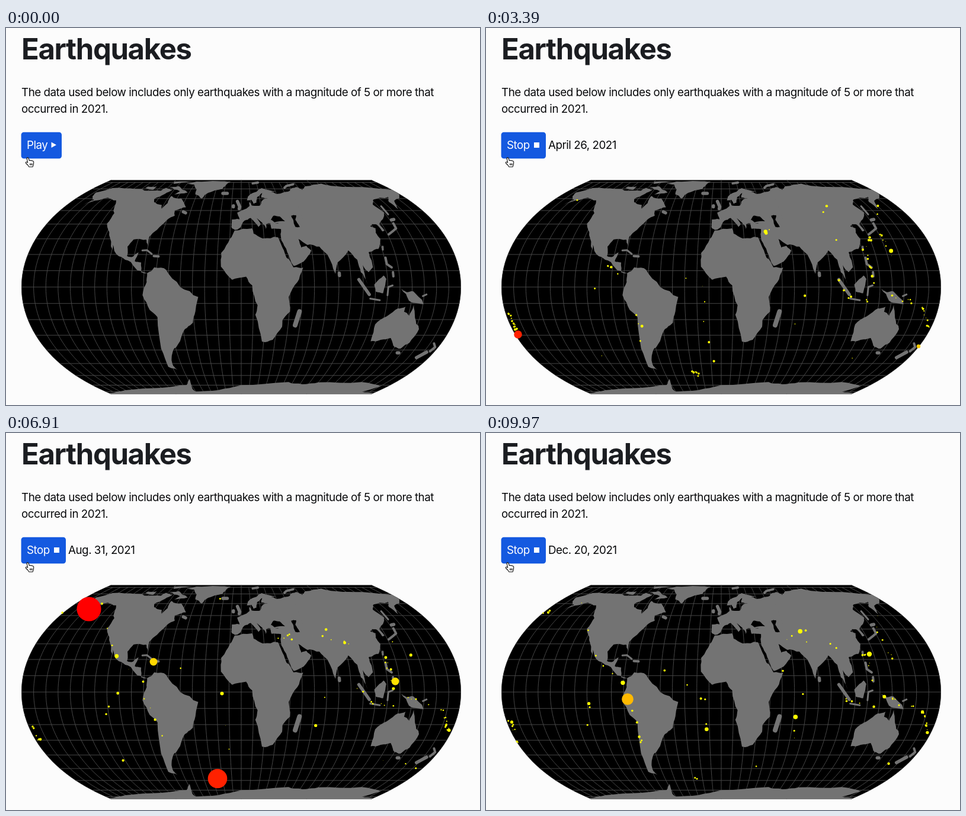
An HTML page with a canvas for the animation above (10000 ms loop, 800 by 636 pixels).

```html
<!DOCTYPE html>
<html lang="en">
<head>
<meta charset="utf-8">
<title>Earthquakes</title>
<style>
  html, body { margin: 0; width: 100%; height: 100%; overflow: hidden; background: #fcfcfc; }
  canvas, svg { position: absolute; left: 0; top: 0; width: 800px; height: 636px; }
  text { font: 18.8px Inter, "Open Sans", sans-serif; letter-spacing: -0.0256em; fill: #08090b; }
  .title { font-size: 49px; font-weight: 700; letter-spacing: -0.0277em; fill: #1b1d21; }
  .label { fill: #fff; }
</style>
</head>
<body>
<canvas id="map" width="800" height="636"></canvas>
<svg viewBox="0 0 800 636">
  <text class="title" x="26" y="53">Earthquakes</text>
  <text x="26" y="115">The data used below includes only earthquakes with a magnitude of 5 or more that</text>
  <text x="26" y="143">occurred in 2021.</text>
  <rect id="button" x="25.6" y="175.7" height="44.5" rx="4.5" fill="#1459e0"/>
  <text id="label" class="label" x="35" y="204">Play</text>
  <path id="icon" fill="#fff"/>
  <text id="date" x="105" y="204"></text>
  <path d="M35 219.6c.8-1.5 2.6-1.2 3 .2l1.3 3.7 1.3-.3 1.4.5 1.4-.2 1.3.8c1.6 0 2.1 1 2 2.5l-.4 3.8-1.2 3.6h-6.3l-1.7-2.7-3.6-3.5c-.8-1.5.7-2.5 2-1.7l1.2.8zM40.6 228.5v3M42.4 228.5v3M44.2 228.5v3" fill="#fff" stroke="#111" stroke-width="1.1" stroke-linejoin="round"/>
</svg>
<script>
const LOOP = 10000, START = 190, DAYS_PER_MS = 0.0361, LIFE = 60;
const $ = id => document.getElementById(id);
const rad = Math.PI / 180;
const mix = (a, b, f) => a + (b - a) * f;
const pairs = s => s.trim().split(',').map(p => p.trim().split(' ').map(Number));

let seed = 2021;
function rand() {
  seed = (seed + 0x6D2B79F5) | 0;
  let t = Math.imul(seed ^ (seed >>> 15), 1 | seed);
  t ^= t + Math.imul(t ^ (t >>> 7), 61 | t);
  return ((t ^ (t >>> 14)) >>> 0) / 4294967296;
}

// Equal Earth projection
function project([lon, lat]) {
  const M = Math.sqrt(3) / 2, a = 1.340264, b = -0.081106, c = 0.000893, d = 0.003796;
  const l = Math.asin(M * Math.sin(lat * rad)), l2 = l * l, l6 = l2 ** 3;
  const x = lon * rad * Math.cos(l) / (M * (a + 3 * b * l2 + l6 * (7 * c + 9 * d * l2)));
  const y = l * (a + b * l2 + l6 * (c + d * l2));
  return [397 + 137.07 * x, 437 - 137.07 * y];
}

const base = document.createElement('canvas');
base.width = 800;
base.height = 636;
const g = base.getContext('2d');
g.lineCap = g.lineJoin = 'round';

function trace(points) {
  g.beginPath();
  points.forEach(p => g.lineTo(...project(p)));
}
const meridian = (lon, top) => Array.from({ length: 61 }, (_, i) => [lon, top * (i / 30 - 1)]);

// Adds a displaced midpoint to every edge
function roughen(points) {
  return points.flatMap(([x, y], i) => {
    const [x2, y2] = points[(i + 1) % points.length];
    const size = Math.min(1.4, 0.2 * Math.hypot(x2 - x, y2 - y));
    return [[x, y], [mix(x, x2, 0.5) + (rand() - 0.5) * size, mix(y, y2, 0.5) + (rand() - 0.5) * size]];
  });
}

function land(outline, colour = '#737373') {
  g.fillStyle = colour;
  trace(roughen(roughen(pairs(outline))));
  g.fill();
}

// Long islands as thick rounded strokes
function islands(width, lines) {
  g.strokeStyle = '#737373';
  g.lineWidth = width;
  for (const line of lines.split(';')) {
    trace(pairs(line));
    g.stroke();
  }
}

trace([...meridian(-180, 90), ...meridian(180, 90).reverse()]);
g.fillStyle = '#000';
g.fill();
g.clip();
g.strokeStyle = '#464646';
for (let lon = -180; lon <= 180; lon += 10) {
  trace(meridian(lon, lon % 90 ? 80 : 90));
  g.stroke();
}
for (let lat = -80; lat <= 80; lat += 10) {
  trace([[-180, lat], [180, lat]]);
  g.stroke();
}

// North America, Greenland and the Arctic
land(`-168 66,-157 71,-128 70,-110 68,-95 68,-92 71.5,-82 69,-87 64.5,-94 60,-92 57,-82 54.5,-80 51.3,-77 56,
-78 62.4,-70 60,-65 60,-56 52.5,-66 50,-64 46,-70 43,-76 36,-81 31.5,-80.3 25.3,-83 29.5,-94 29.6,-97.5 25,
-96 19,-91 18.6,-87 21.4,-88.8 15.9,-83.3 15,-82.5 9,-77.5 8.5,-85.8 10.2,-94.5 16.2,-105.5 20.3,-113 31,
-109.5 23,-117 32.5,-124.3 40.3,-124 48,-134 58.5,-146 60.8,-154 58.5,-163 54.8,-158 58.7,-165 62`);
land('-70 77,-60 82,-32 83.5,-14 81.5,-20 74,-23 70,-38 65.7,-43 60,-52 64,-54 70,-60 76');
land('-62 66,-76 64,-72 67.5,-89 72,-78 73.6');
land('-117 71,-105 69,-105 73,-116 73');
land('-88 77,-64 82.5,-90 81.5');
// South America
land(`-77.5 8.5,-72 12,-62 10.5,-50 0,-35.3 -6,-39 -17,-41 -22,-48.5 -26,-57 -36,-62.3 -39.5,-67 -46,-68.5 -52,
-66 -55,-74 -52.5,-73.6 -39,-70.3 -18.4,-76 -14,-81 -5,-77.5 3`);
// Africa
land(`-6 35.5,10 37,11 33.5,19 30.3,32.5 31,35.5 24,38 18,43.2 12,51.2 11.8,46 3,39 -6,40.6 -15,35 -20,35 -24.5,
28 -33,18.5 -34.2,11.8 -17,13.5 -11,9 1,4 6.3,-7.5 4.4,-16.8 12.5,-17 21,-10 30`);
// Europe
land(`-6 36,-9 38,-8.8 43.3,-1.5 43.4,-4 48.4,8.5 53.7,8.5 57,11 54,20 54.5,23.5 59,29 60,22 61,24 65.5,17.3 61,
16 56.5,12.8 55.5,11 59,6 58.5,10 64,25 71,41 67,35 66.5,40 64.5,60 69,62 40,36 40,27 40.5,23 40,22.5 36.5,
19.5 41,13 45.5,18 40,15.8 38,9 44.4,3 42.5,-1 37.5`);
// Asia
land(`58 69,68 72.5,73 69,80 73.5,104 77.6,113 74,140 72.5,180 69,180 65,171 60,163 58,157 51,156 57,162 61.5,
143 59.3,136 54.7,140 48.5,127.5 40,129 35.5,126.5 35,125 39.5,121 40,118 38.5,122 37,120 34,121.8 30,117 23.5,
108 21.5,109 12,105 9,100.9 13.4,103.5 1.5,98.5 9,97 16.7,91 22.5,80.2 15,77.5 8,72.6 20,67 25,57 26,50 30,
51.5 24.3,56 25.5,59.5 22.5,52 15.6,43.5 12.8,39 21.3,35 29,36 36.5,27.5 36.7,27 40.5,58 42`);
// Black Sea and Caspian Sea
land('28 43,31 46,37 45.5,41 42,31 41.3', '#000');
land('48 46,53 46.5,51 43,53.5 38,49.5 38,49 42', '#000');
// Australia and Antarctica
land(`114 -23,115.5 -34,124 -33,132 -31.8,140 -38,146.5 -39,151 -35,153 -26,146 -18.8,142.5 -10.8,140.5 -17.5,
135.5 -15,136 -12,130 -13,122 -18`);
land(`-180 -90,-180 -84,-150 -77,-100 -73.5,-66 -70,-58 -63.3,-62 -75,-60 -80,-30 -77,0 -70,55 -66.5,73 -69,
90 -66.8,140 -66.5,171 -71.5,160 -80,180 -84,180 -90`);
land('109 1.5,117 7,119 5,116.3 -3.8,110.2 -2.8');
land('131 -1,135 -3,141 -2.6,150.5 -10.5,138 -8.3');
islands(3, `106 -7,114 -8;120 -5,120.5 0,124 1;142.5 47,143 53.5;-84 22.5,-80 22.7,-75.5 20.3;120.6 23,121.3 25;
149 -5.5,152 -4.5`);
islands(4, `131 33,137 35.5,140.5 37,141 40.5;121 18,121 14,124.5 12;125 9,125 6.5;173.5 -35.5,177 -38,175.5 -41;
-73.5 19,-69.5 18.8;15 78,22 79.5;53 71.5,57 74,67 76.5`);
islands(5.5, `-2 51.5,-1.5 53,-4 57.5;-8 53.8,-8 53;-21 65,-16 65;96.5 4.5,105 -4.5;141.5 43,144 43.3;
173 -41.5,168 -45.5;146 -42,147.5 -42;80.7 8.5,80.7 7;-57 49,-54.5 48.2`);
islands(8, '46 -23.5,48.5 -15');

// Quakes: [day, x, y, magnitude]
const quakes = pairs(`62.5 54 517 8.1,40.5 737 499 7.7,62.5 730 537 7.3,43.5 659 336 7.1,120.5 658 335 6.8,
133 596 436 6.7,209 140 297 8.2,223 357 583 8.1,225 249 386 7.2,222 657 419 7.1,274 745 495 7.3,250 195 390 7,
331 239 449 7.5,312 647 373 6.7`);

// Scatters small quakes along a plate boundary
function zone(count, spread, line) {
  const p = pairs(line);
  for (let i = 0; i < count; i++) {
    const u = rand() * (p.length - 1), k = Math.floor(u);
    const at = j => mix(p[k][j], p[k + 1][j], u - k) + (rand() + rand() - 1) * spread;
    quakes.push([rand() * 362, at(0), at(1), Math.min(6.4, 5.45 - 0.3 * Math.log(1 - rand()))]);
  }
}
zone(70, 4, '39 480,56 522');                           // Tonga
zone(60, 4, '736 468,747 504');                         // Vanuatu
zone(45, 5, '673 445,726 466');                         // New Guinea
zone(50, 5, '592 424,613 455,660 460');                 // Sunda arc
zone(45, 5, '640 372,657 435');                         // Philippines
zone(45, 4, '637 375,658 340,662 300');                 // Japan and Kurils
zone(30, 4, '662 345,690 388');                         // Marianas
zone(24, 3, '94 305,168 285');                          // Aleutians
zone(18, 3, '168 321,190 386');                         // California
zone(26, 4, '195 390,230 422');                         // Central America
zone(36, 5, '233 447,263 510,260 535');                 // Andes
zone(24, 6, '188 432,170 470,200 576');                 // East Pacific
zone(40, 4, '350 577,358 585');                         // South Sandwich
zone(36, 5, '365 281,298 398,365 440,371 500,384 580'); // Mid-Atlantic
zone(30, 6, '497 400,540 440,514 518,433 573');         // Indian Ocean
zone(14, 7, '540 545,688 560');                         // Southern Ocean
zone(40, 7, '440 340,530 345,598 358');                 // Alps to Himalaya
zone(16, 5, '530 337,585 295');                         // Central Asia
quakes.sort((a, b) => a[3] - b[3]);

// Yellow through orange to red
function colour(m) {
  const green = m < 7.7 ? 255 - 100 * Math.max(0, m - 6.8) : 330 * (8.2 - m);
  return `rgb(255,${Math.round(green)},0)`;
}

const months = ['Jan.', 'Feb.', 'March', 'April', 'May', 'June', 'July', 'Aug.', 'Sep.', 'Oct.', 'Nov.', 'Dec.'];
function dateText(day) {
  const d = new Date(Date.UTC(2021, 0, 1 + Math.floor(day)));
  return `${months[d.getUTCMonth()]} ${d.getUTCDate()}, 2021`;
}

const ctx = $('map').getContext('2d');
function draw() {
  const t = performance.now() % LOOP, playing = t >= START;
  const day = (t - START) * DAYS_PER_MS;
  $('label').textContent = playing ? 'Stop' : 'Play';
  $('button').setAttribute('width', playing ? 75.4 : 68.4);
  $('icon').setAttribute('d', playing ? 'M81 193h9v9h-9z' : 'M76.5 192.5l8.5 4.7-8.5 4.7z');
  $('date').textContent = playing ? dateText(day) : '';

  ctx.clearRect(0, 0, 800, 636);
  ctx.drawImage(base, 0, 0);
  for (const [start, x, y, m] of quakes) {
    const age = day - start;
    if (age <= 0 || age >= LIFE) continue;
    const r = 6.7 * Math.exp(0.95 * (m - 7)) * Math.sin(Math.PI * age / LIFE);
    ctx.fillStyle = colour(m);
    ctx.beginPath();
    ctx.arc(x, y, r, 0, 2 * Math.PI);
    ctx.fill();
  }
  requestAnimationFrame(draw);
}
draw();
</script>
</body>
</html>
```
